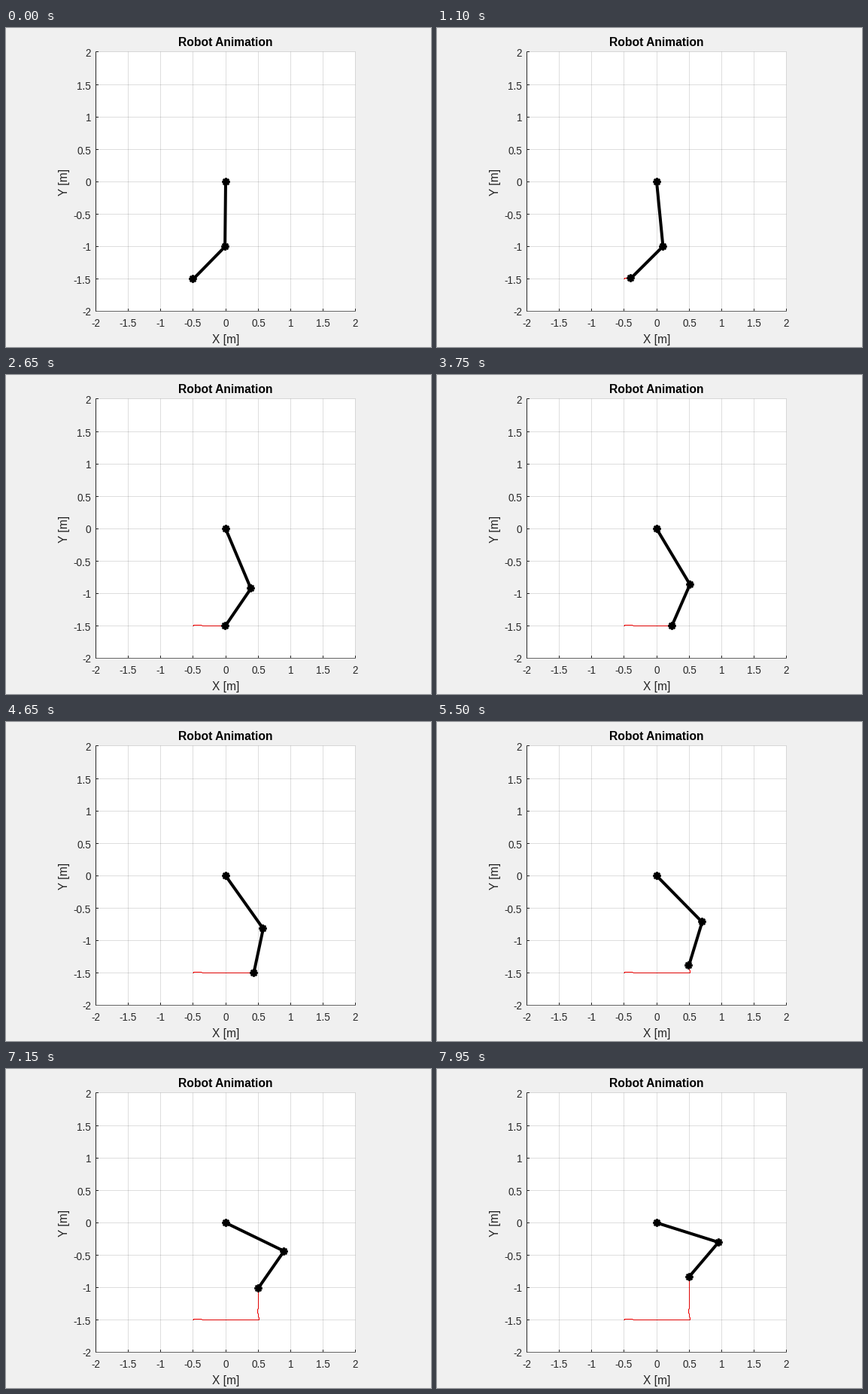
A matplotlib script that plays this animation: 565x424 px, repeating every 8 s.

```python
import numpy as np
import matplotlib.pyplot as plt
from matplotlib.animation import FuncAnimation
from matplotlib.patches import Rectangle

plt.rcParams["font.family"] = "Liberation Sans"
plt.rcParams["path.simplify"] = False
plt.rcParams["path.snap"] = False  # coordinates below are already on pixel centres

W, H, DPI = 565, 424, 64
PT = 72 / DPI                      # points per pixel
SCALE, X0, Y0 = 86.25, 292.0, 204.4
L1, L2 = 1.0, 0.7
SPEED = 1 / 90                     # metres per step
CORNER, STEPS, HOLD = 90, 150, 9
DARK = "#262626"


def to_px(x, y):
    return X0 + SCALE * x, Y0 - SCALE * y


def snap(v):
    return np.floor(v) + 0.5


def ringing(k, decay, freq):
    """Tracking error after a sudden change of speed."""
    return SPEED / freq * np.exp(-decay * k) * np.sin(freq * k)


def tip(k):
    """Tip of the arm: right along the bottom side, then straight up."""
    if k <= CORNER:
        x = -0.5 + SPEED * k - ringing(k, 0.07, 0.1)
        y = -1.5 + 0.0055 * k * np.exp(-k / 7)
    else:
        j = k - CORNER
        x = 0.5 + 0.7 * ringing(j, 0.15, 0.35)
        y = -1.5 + SPEED * j - ringing(j, 0.2, 0.2)
    return x, y


def elbow(x, y):
    r = np.hypot(x, y)
    bend = np.arccos((r * r + L1 * L1 - L2 * L2) / (2 * L1 * r))
    a = np.arctan2(y, x) + bend
    return L1 * np.cos(a), L1 * np.sin(a)


def stars(xs, ys, radius=5.3):
    """Asterisks as separate strokes through each joint."""
    px, py = [], []
    for x, y in zip(xs, ys):
        for a in np.arange(4) * np.pi / 4:
            dx, dy = radius * np.cos(a), radius * np.sin(a)
            px += [x - dx, x + dx, np.nan]
            py += [y - dy, y + dy, np.nan]
    return px, py


fig = plt.figure(figsize=(W / DPI, H / DPI), dpi=DPI, facecolor="#f0f0f0")
ax = fig.add_axes([0, 0, 1, 1])
ax.set_xlim(0, W)
ax.set_ylim(H, 0)
ax.axis("off")


def line(xs, ys, color, width=1, z=3, **kw):
    return ax.plot(xs, ys, color=color, lw=width * PT, zorder=z,
                   solid_capstyle="butt", **kw)[0]


def label(x, y, s, size, color=DARK, **kw):
    ax.text(x, y, s, fontsize=size * PT, color=color, va="baseline", **kw)


# Plot area, grid, ticks and labels
left, right, top, bottom = 119.5, 464.5, 31.5, 376.5
ax.add_patch(Rectangle((left, top), right - left, bottom - top,
                       fc="white", ec="none", zorder=1))
for v in np.linspace(-2, 2, 9):
    gx, gy = map(snap, to_px(v, v))
    line([gx, gx], [top, bottom], DARK, alpha=0.15)
    line([left, right], [gy, gy], DARK, alpha=0.15)
    line([gx, gx], [bottom, bottom - 3.5], DARK)
    line([left, left + 3.5], [gy, gy], DARK)
    label(gx, 397, f"{v:g}", 13.5, ha="center")
    label(113.2, gy + 6, f"{v:g}", 13.5, ha="right")
line([left, left], [top, bottom + 0.5], DARK)
line([left, right], [bottom, bottom], "#666666")

label(292.1, 24, "Robot Animation", 15.6, "black", weight="bold", ha="center")
label(291.7, 419, "X [m]", 15.5, ha="center")
label(82, 205, "Y [m]", 15.5, rotation=90, rotation_mode="anchor", ha="center")

path = np.array([snap(to_px(*tip(k))) for k in range(STEPS + 1)])
trail = line([], [], "red", z=2)
links = line([], [], "black", 4, z=4)
joints = line([], [], "black", 3, z=5)


def update(n):
    k = max(0, n - HOLD)
    x, y = tip(k)
    ex, ey = elbow(x, y)
    xs, ys = to_px(np.array([0, ex, x]), np.array([0, ey, y]))
    trail.set_data(path[:k + 1, 0], path[:k + 1, 1])
    links.set_data(xs, ys)
    joints.set_data(*stars(snap(xs), snap(ys)))
    return trail, links, joints


anim = FuncAnimation(fig, update, frames=160, interval=50, repeat=True,
                     repeat_delay=0, blit=False)
plt.show()
```
